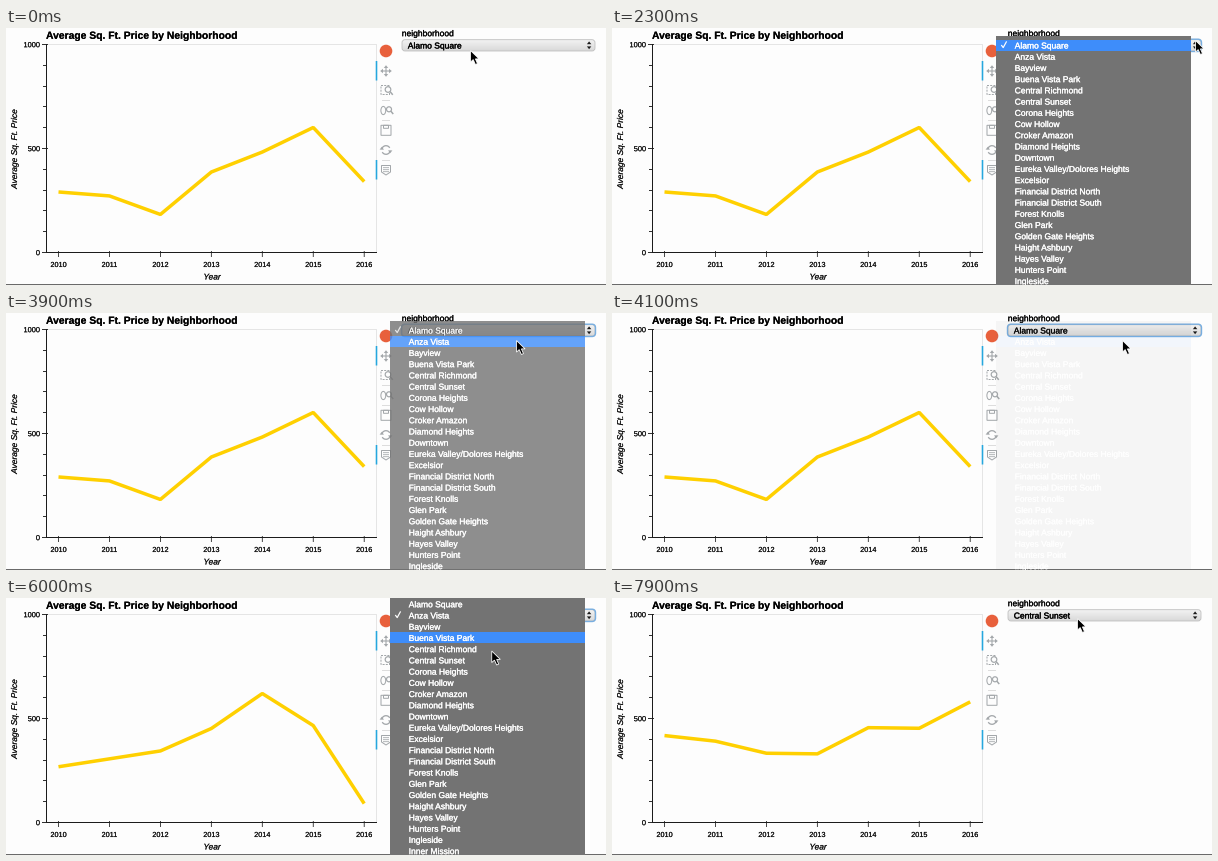
Recreate the animation shown at these times as a matplotlib script. Size 600 by 257 pixels, loop 8 s.

```python
import numpy as np
import matplotlib.pyplot as plt
from matplotlib import patheffects
from matplotlib.animation import FuncAnimation
from matplotlib.patches import Arc, Circle, Ellipse, FancyBboxPatch, Polygon, Rectangle

W, H, DPI = 600, 257, 100
PX = 72 / DPI
STEP, FRAMES = 100, 80
PAGE, AXIS, ICON, BLUE = "#fdfdfd", "#1c1c1c", "#a3a7aa", "#26a7de"
ROW_Y, ROW_H = 17.5, 11.22
MENU_X, MENU_W = 384, 195
FADE, SETTLE = 350, 400

plt.rcParams.update({"font.family": "Liberation Sans", "toolbar": "None"})

PLACES = [
    "Alamo Square", "Anza Vista", "Bayview", "Buena Vista Park",
    "Central Richmond", "Central Sunset", "Corona Heights", "Cow Hollow",
    "Croker Amazon", "Diamond Heights", "Downtown",
    "Eureka Valley/Dolores Heights", "Excelsior",
    "Financial District North", "Financial District South",
    "Forest Knolls", "Glen Park", "Golden Gate Heights", "Haight Ashbury",
    "Hayes Valley", "Hunters Point", "Ingleside", "Inner Mission",
]

PRICES = {
    "Alamo Square": [291, 272, 183, 387, 483, 601, 341],
    "Anza Vista": [268, 306, 344, 452, 620, 466, 91],
    "Central Sunset": [418, 391, 333, 330, 456, 453, 580],
}

# Each pick: menu opens, item clicked, chart redrawn (ms), place
PICKS = [(2000, 3800, 4600, "Anza Vista"),
         (5700, 6400, 7000, "Central Sunset")]

# Pointer moves: start, end (ms), destination
HOME = (464, 23)
MOVES = [(900, 1800, (583, 13)), (2700, 3000, (535, 74)),
         (3000, 3700, (510, 28)), (4600, 5400, (492, 16)),
         (5700, 6300, (483, 66)), (7300, 7900, (465, 21))]

fig = plt.figure(figsize=(W / DPI, H / DPI), dpi=DPI, facecolor=PAGE)
ax = fig.add_axes([0, 0, 1, 1])
ax.axis("off")


def progress(ms, start, length):
    return np.clip((ms - start) / length, 0, 1)


def pointer_at(ms):
    pos = np.array(HOME, float)
    for start, end, goal in MOVES:
        ease = 1 - (1 - progress(ms, start, end - start)) ** 2
        pos += (goal - pos) * ease
    return pos


def state_at(ms):
    """Return the selected place, the charted place and the menu opacity."""
    chosen = charted = PLACES[0]
    opacity = 0
    for opened, picked, redrawn, place in PICKS:
        if ms >= opened:
            u = progress(ms, picked, FADE)
            opacity = 1 - u * u * (3 - 2 * u)
        if ms >= picked + SETTLE:
            chosen = place
        if ms >= redrawn:
            charted = place
    return chosen, charted, opacity


def line(xs, ys, color=AXIS, width=1.0, z=2, **kw):
    return ax.plot(xs, ys, color=color, lw=width * PX, zorder=z, snap=False,
                   solid_capstyle="butt", **kw)[0]


def label(x, y, text, size, color="#111111", z=3, ink=0.1, **kw):
    kw.setdefault("va", "baseline")
    stroke = patheffects.withStroke(linewidth=ink * PX, foreground=color)
    return ax.text(x, y, text, fontsize=size * PX, color=color, zorder=z,
                   path_effects=[stroke], **kw)


def shape(patch, z=2):
    patch.set_zorder(z)
    patch.set_snap(False)
    return ax.add_patch(patch)


def outline(cls, *args, width=1.0, **kw):
    return shape(cls(*args, fill=False, ec=ICON, lw=width * PX, **kw))


def triangle(x, y, dx, dy, half=2.2, length=2.8, color=ICON, z=3):
    """Arrow head with its base centred at x, y, pointing along dx, dy."""
    base, ahead = np.array([x, y]), np.array([dx, dy])
    side = half * np.array([-dy, dx])
    shape(Polygon([base + ahead * length, base + side, base - side],
                  fc=color, ec="none"), z)


def lens(x, y, r):
    line([x + 0.7 * r, x + 1.7 * r], [y + 0.7 * r, y + 1.9 * r], ICON, 1.5)
    shape(Circle((x, y), r, fc=PAGE, ec=ICON, lw=1.2 * PX))


def year_x(i):
    return 52.5 + 50.95 * i


def price_y(price):
    return 224.5 - 0.208 * np.asarray(price)


def draw_chart():
    label(40, 10.8, "Average Sq. Ft. Price by Neighborhood", 10.34, "black",
          weight="bold")
    line([40, 370.5, 370.5], [16.5, 16.5, 224], "#e5e5e5")
    line([40.5, 40.5], [16, 225])
    line([40, 371], [224.5, 224.5])
    for price in range(0, 1001, 100):
        y = np.floor(price_y(price)) + 0.5
        major = price % 500 == 0
        line([36, 42] if major else [37, 40], [y, y], width=0.9)
        if major:
            label(34, y + 2.7, str(price), 7.4, ha="right")
    for i in range(7):
        x = year_x(i)
        line([x, x], [223, 229], width=0.8)
        label(x, 239, str(2010 + i), 7.3, ha="center")
    label(206, 251.5, "Year", 8.4, ha="center", style="italic")
    label(9.5, 121, "Average Sq. Ft. Price", 8.4, ha="center", va="center",
          style="italic", rotation=90)
    line([0, W], [256.5, 256.5], "#6a6a6a")


def draw_toolbar():
    shape(Circle((380, 23), 6.3, fc="#e8603c", ec="none"))
    for y in (43, 142):
        line([370.5, 370.5], [y - 10, y + 9.5], BLUE, 1.6)
    for y in (72.5, 92.5, 132.5):
        line([376, 384], [y, y], "#dddddd")

    # pan
    for dx, dy in ((1, 0), (-1, 0), (0, 1), (0, -1)):
        line([380, 380 + 4 * dx], [43, 43 + 4 * dy], ICON, 1.1)
        triangle(380 + 3 * dx, 43 + 3 * dy, dx, dy)

    # box zoom and wheel zoom
    outline(Rectangle, (375, 57.5), 8.5, 9, ls=(0, (2, 1.2)))
    lens(382, 61.5, 2.8)
    outline(Ellipse, (377.3, 82.5), 4.8, 8.2)
    lens(383, 81.3, 2.5)

    # save
    outline(Rectangle, (375, 97.3), 10, 10)
    outline(Rectangle, (377.5, 97.3), 5, 3)

    # reset
    for start, way in ((10, 1), (190, -1)):
        outline(Arc, (380, 122), 8.6, 8.6, theta1=start, theta2=start + 140,
                width=1.3)
        triangle(380 - 4.2 * way, 122 - 0.4 * way, 0, -way)

    # hover
    outline(Polygon, [(375.5, 137.5), (384.5, 137.5), (384.5, 144),
                      (380, 147), (375.5, 144)])
    for y in (139.7, 141.7, 143.7):
        line([377, 383], [y, y], ICON, 0.8)


def rounded(pad, **kw):
    return FancyBboxPatch((396 - pad, 11.7 - pad), 193 + 2 * pad, 11.3 + 2 * pad,
                          boxstyle=f"round,pad=0,rounding_size={3 + pad}",
                          fc="none", **kw)


def draw_select():
    label(395.8, 8.2, "neighborhood", 8.5, "black", ink=0.2)
    frame = shape(rounded(0, ec="#bdbdbd", lw=0.8 * PX), 3)
    shade = np.linspace(0.95, 0.85, 12)[:, None]
    fill = ax.imshow(shade, cmap="gray", vmin=0, vmax=1, aspect="auto",
                     extent=(396, 589, 23, 11.7), zorder=2)
    fill.set_clip_path(frame)
    for way in (-1, 1):
        triangle(583.1, 17.3 + 1.1 * way, 0, way, color="#1a1a1a", z=4)


draw_chart()
draw_toolbar()
draw_select()

curve = line([], [], "#ffd000", 3.5, 3, solid_joinstyle="bevel")
focus = shape(rounded(0.5, ec="#78aee0", lw=1.4 * PX), 4)
choice_text = label(401.8, 20.5, "", 8.5, "black", 4, ink=0.3)


def menu_part(color):
    return shape(Rectangle((MENU_X, 0), MENU_W, 0, fc=color, ec="none",
                           antialiased=False), 6)


above, below, hover = (menu_part(c) for c in ("#737373", "#737373", "#3e8dfa"))
check = line([389.3, 391.2, 394.6], [17, 19.6, 13.4], "white", 1.2, 8)
items = [label(402.7, 0, place, 8.5, "white", 8, ink=0.25, clip_on=True)
         for place in PLACES]

ARROW = np.array([(0, 0), (0, 11.6), (2.7, 9.1), (4.9, 14), (7, 13.1),
                  (4.9, 8.4), (8.6, 8.4)]) + (0.5, -0.5)
arrow = shape(Polygon(ARROW, fc="black", ec="white", lw=0.8 * PX), 20)

ax.set_xlim(0, W)
ax.set_ylim(H, 0)


def set_span(part, top, bottom, opacity):
    part.set_y(top)
    part.set_height(bottom - top)
    part.set_alpha(opacity)


def update_menu(ms, choice, opacity):
    for artist in (above, below, hover, check, *items):
        artist.set_visible(opacity > 0)
    if opacity == 0:
        return

    # the highlight trails the pointer by one step
    slot = round((pointer_at(ms - STEP)[1] - ROW_Y) / ROW_H)
    top = max(0, round(ROW_Y - choice * ROW_H - 9.5))
    mid = round(ROW_Y + slot * ROW_H - 5.5)
    set_span(above, top, mid, opacity)
    set_span(hover, mid, mid + 11, opacity)
    set_span(below, mid + 11, H, opacity)

    check.set_alpha(opacity)
    for i, item in enumerate(items):
        y = ROW_Y + (i - choice) * ROW_H
        item.set_y(y + 3)
        item.set_alpha(opacity if y < 24 else 1)


def update(frame):
    ms = frame * STEP
    chosen, charted, opacity = state_at(ms)
    curve.set_data(year_x(np.arange(7)), price_y(PRICES[charted]))
    choice_text.set_text(chosen)
    focus.set_visible(opacity > 0)
    update_menu(ms, PLACES.index(chosen), opacity)
    arrow.set_xy(ARROW + pointer_at(ms))
    return []


anim = FuncAnimation(fig, update, frames=FRAMES, interval=STEP, repeat=True,
                     repeat_delay=0, blit=False)
plt.show()
```
